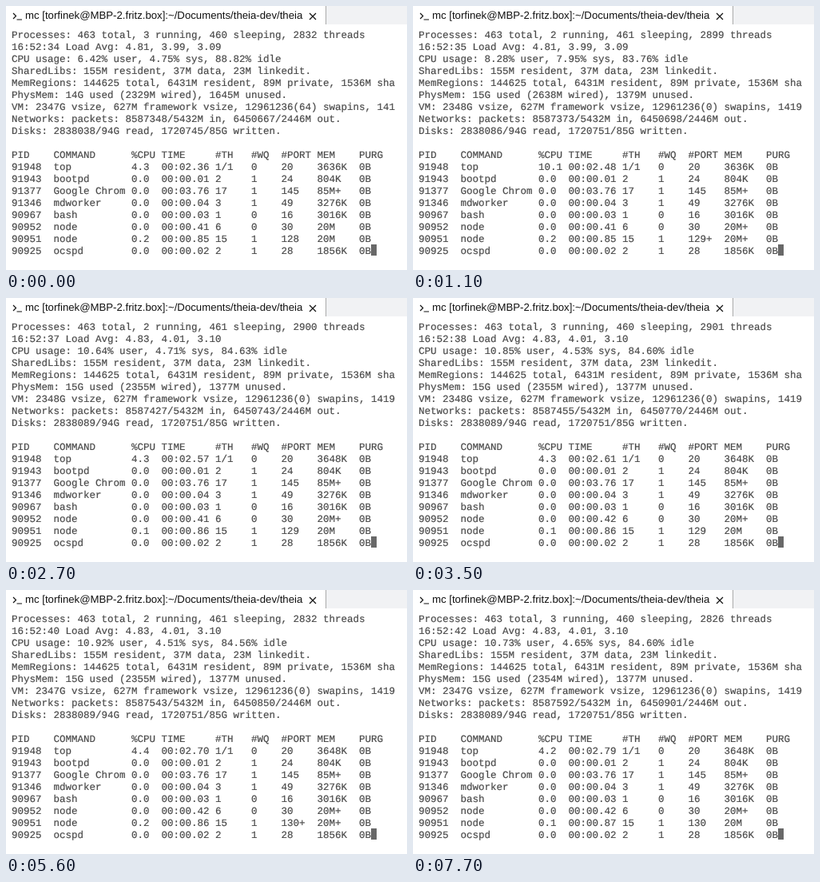
Recreate the animation shown at these times as an HTML page. Size 502 by 330 pixels, loop 7800 ms.

```html
<!DOCTYPE html>
<html lang="en">
<head>
<meta charset="utf-8">
<title>Terminal</title>
<style>
  html, body { margin: 0; width: 100%; height: 100%; overflow: hidden; background: #fff; }
  svg { display: block; width: 502px; height: 330px; }
  text { white-space: pre; text-rendering: geometricPrecision; }
  .tab { font: 13.2px "Liberation Sans", Arial, sans-serif; fill: #111; }
  #term {
    font: 12.5px "Liberation Mono", "Courier New", monospace;
    fill: #4a4a4a; stroke: #4a4a4a; stroke-width: 0.2;
  }
  .icon { fill: none; stroke: #111; stroke-width: 1.2; }
</style>
</head>
<body>
<svg viewBox="0 0 502 330">
  <rect width="502" height="330" fill="#fff"/>
  <rect x="401" width="101" height="23" fill="#f1f2f4"/>
  <rect x="400" width="1" height="23" fill="#aaa"/>
  <path class="icon" d="M9 9l3.5 3.5L9 16M13.5 17h6.5"/>
  <text class="tab" x="24" y="16.3">mc [torfinek@MBP-2.fritz.box]:~/Documents/theia-dev/theia</text>
  <path class="icon" d="M380 9l8 8M388 9l-8 8"/>
  <rect x="457" y="298" width="7" height="14" fill="#686868"/>
  <g id="term"></g>
</svg>
<script>
const LOOP = 7800, COLS = 64, LEFT = 7, BASE = 40.2, PITCH = 15;

// Each refresh lists only what differs from the one before it.
const refreshes = [
  { at: 0, run: 3, threads: 2832, load: "4.81, 3.99, 3.09", cpu: "6.42 4.75 88.82",
    used: "14G", wired: 2329, unused: 1645, vsize: 2347, swap: "64",
    rx: 348, tx: 667, reads: "038", writes: "45",
    top: "4.3 02.36", topMem: "3636K", idleNode: "00.41", idleMem: "20M",
    node: "0.2 00.85", port: "128", nodeMem: "20M" },
  { at: 400, run: 2, threads: 2899, cpu: "8.28 7.95 83.76", used: "15G", wired: 2638,
    unused: 1379, vsize: 2348, swap: "0", rx: 373, tx: 698, reads: "086", writes: "51",
    top: "10.1 02.48", idleMem: "20M+", port: "129+", nodeMem: "20M+" },
  { at: 1400, run: 3, threads: 2900, cpu: "10.93 4.87 84.18", wired: 2355, unused: 1377,
    rx: 398, tx: 716, reads: "089", top: "4.3 02.52",
    node: "0.1 00.86", port: "129", nodeMem: "20M" },
  { at: 2400, run: 2, load: "4.83, 4.01, 3.10", cpu: "10.64 4.71 84.63",
    rx: 427, tx: 743, top: "4.3 02.57", topMem: "3648K" },
  { at: 3500, run: 3, threads: 2901, cpu: "10.85 4.53 84.60",
    rx: 455, tx: 770, top: "4.3 02.61", idleNode: "00.42" },
  { at: 4500, run: 2, threads: 2899, cpu: "10.30 4.97 84.71", unused: 1373,
    rx: 510, tx: 818, top: "4.3 02.66" },
  { at: 5500, threads: 2832, cpu: "10.92 4.51 84.56", unused: 1377, vsize: 2347,
    rx: 543, tx: 850, top: "4.4 02.70", node: "0.2 00.86", port: "130+", nodeMem: "20M+" },
  { at: 6700, threads: 2828, cpu: "10.81 4.58 84.60", rx: 568, tx: 876,
    top: "4.3 02.75", node: "0.1 00.86", port: "130", nodeMem: "20M" },
  { at: 7500, run: 3, threads: 2826, cpu: "10.73 4.65 84.60", wired: 2354,
    rx: 592, tx: 901, top: "4.2 02.79", node: "0.1 00.87" }
];

const widths = [7, 13, 5, 9, 6, 5, 6, 7, 4];
const row = cells => cells.map((c, i) => c.padEnd(widths[i])).join("");

function proc(pid, name, usage, th, wq, port, mem) {
  const [cpu, time] = usage.split(" ");
  return row([pid, name, cpu, "00:" + time, th, wq, port, mem, "0B"]);
}

function screen(s, i) {
  const [user, sys, idle] = s.cpu.split(" ");
  return [
    `Processes: 463 total, ${s.run} running, ${463 - s.run} sleeping, ${s.threads} threads`,
    `16:52:${34 + i} Load Avg: ${s.load}`,
    `CPU usage: ${user}% user, ${sys}% sys, ${idle}% idle`,
    "SharedLibs: 155M resident, 37M data, 23M linkedit.",
    "MemRegions: 144625 total, 6431M resident, 89M private, 1536M shared.",
    `PhysMem: ${s.used} used (${s.wired}M wired), ${s.unused}M unused.`,
    `VM: ${s.vsize}G vsize, 627M framework vsize, 12961236(${s.swap}) swapins, 1419`,
    `Networks: packets: 8587${s.rx}/5432M in, 6450${s.tx}/2446M out.`,
    `Disks: 2838${s.reads}/94G read, 17207${s.writes}/85G written.`,
    "",
    row(["PID", "COMMAND", "%CPU", "TIME", "#TH", "#WQ", "#PORT", "MEM", "PURG"]),
    proc("91948", "top", s.top, "1/1", "0", "20", s.topMem),
    proc("91943", "bootpd", "0.0 00.01", "2", "1", "24", "804K"),
    proc("91377", "Google Chrom", "0.0 03.76", "17", "1", "145", "85M+"),
    proc("91346", "mdworker", "0.0 00.04", "3", "1", "49", "3276K"),
    proc("90967", "bash", "0.0 00.03", "1", "0", "16", "3016K"),
    proc("90952", "node", "0.0 " + s.idleNode, "6", "0", "30", s.idleMem),
    proc("90951", "node", s.node, "15", "1", s.port, s.nodeMem),
    proc("90925", "ocspd", "0.0 00.02", "2", "1", "28", "1856K")
  ].map(line => line.slice(0, COLS));
}

let state = {};
const screens = refreshes.map((r, i) => screen(state = { ...state, ...r }, i));

const term = document.getElementById("term");
const lines = screens[0].map((_, i) => {
  const t = document.createElementNS("http://www.w3.org/2000/svg", "text");
  t.setAttribute("x", LEFT);
  t.setAttribute("y", BASE + i * PITCH);
  return term.appendChild(t);
});

let shown = -1;
function draw(time) {
  const t = time % LOOP;
  const now = refreshes.filter(r => r.at <= t).length - 1;
  if (now !== shown) {
    screens[now].forEach((s, i) => { lines[i].textContent = s; });
    shown = now;
  }
}

const start = performance.now();
function tick() {
  draw(performance.now() - start);
  requestAnimationFrame(tick);
}
draw(0);
tick();
</script>
</body>
</html>
```
